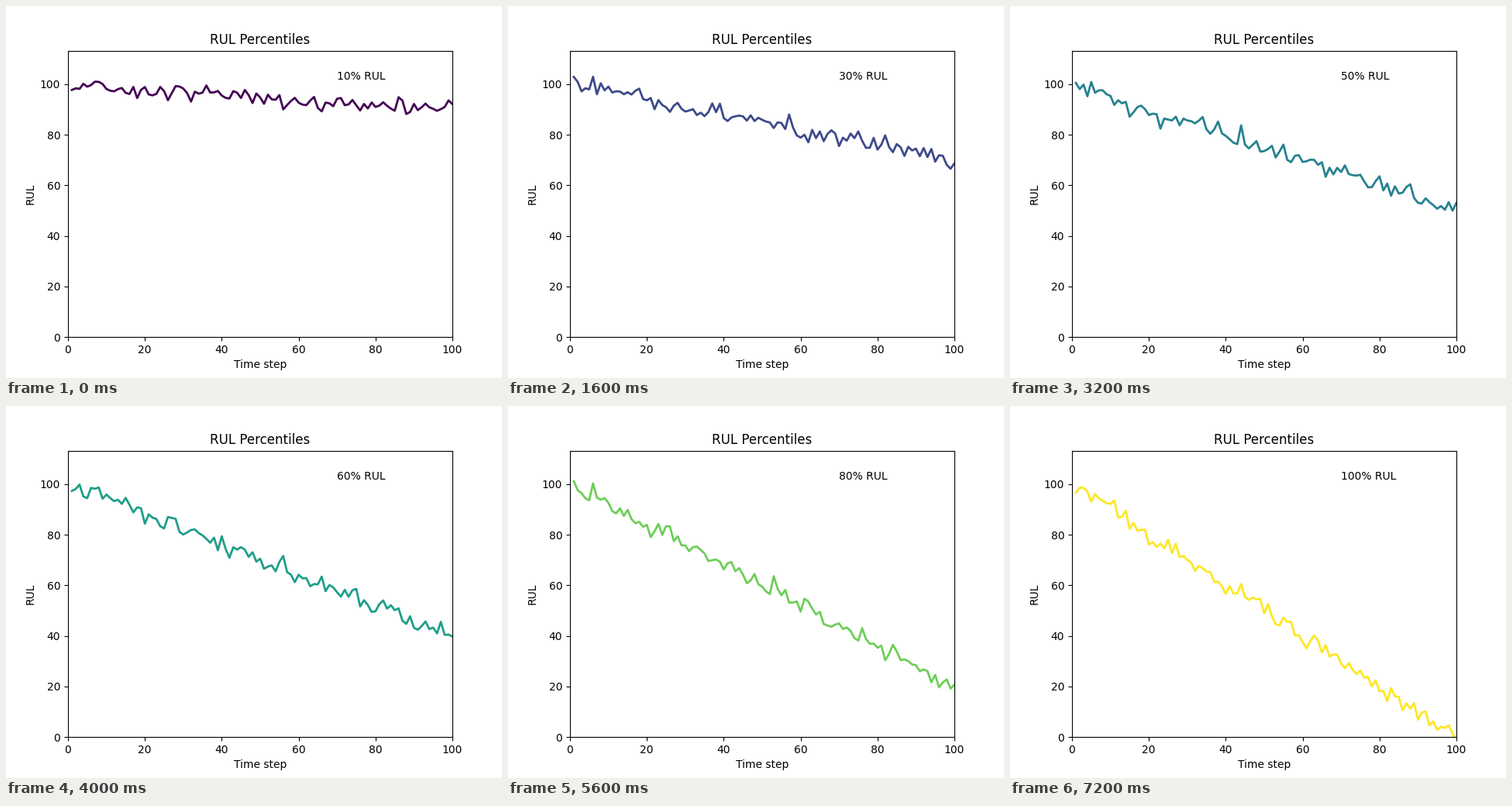
A matplotlib script that plays this animation: 640x480 px, repeating every 8000 ms.

```python
import numpy as np
import matplotlib.pyplot as plt
from matplotlib.animation import FuncAnimation

STEPS = np.arange(1, 101)
LEVELS = np.arange(10, 101, 10)
TOP = 113.25
NOISE = 2


def rul_curve(level):
    """Linear loss of `level` percent over the run, with measurement noise."""
    rng = np.random.default_rng(level)
    return 100 - level / 100 * STEPS + rng.normal(0, NOISE, STEPS.size)


curves = [rul_curve(level) for level in LEVELS]
colors = plt.cm.viridis(np.linspace(0, 1, len(LEVELS)))

fig, ax = plt.subplots(figsize=(6.4, 4.8), dpi=100)
ax.set(xlim=(0, 100), ylim=(0, TOP), title="RUL Percentiles",
       xlabel="Time step", ylabel="RUL")
line, = ax.plot([], [], lw=2)
label = ax.text(70, 0.9 * TOP, "")


def draw(i):
    line.set_data(STEPS, curves[i])
    line.set_color(colors[i])
    label.set_text(f"{LEVELS[i]}% RUL")
    return line, label


anim = FuncAnimation(fig, draw, frames=len(LEVELS), interval=800,
                     init_func=lambda: draw(0), repeat=True)
plt.show()
```
